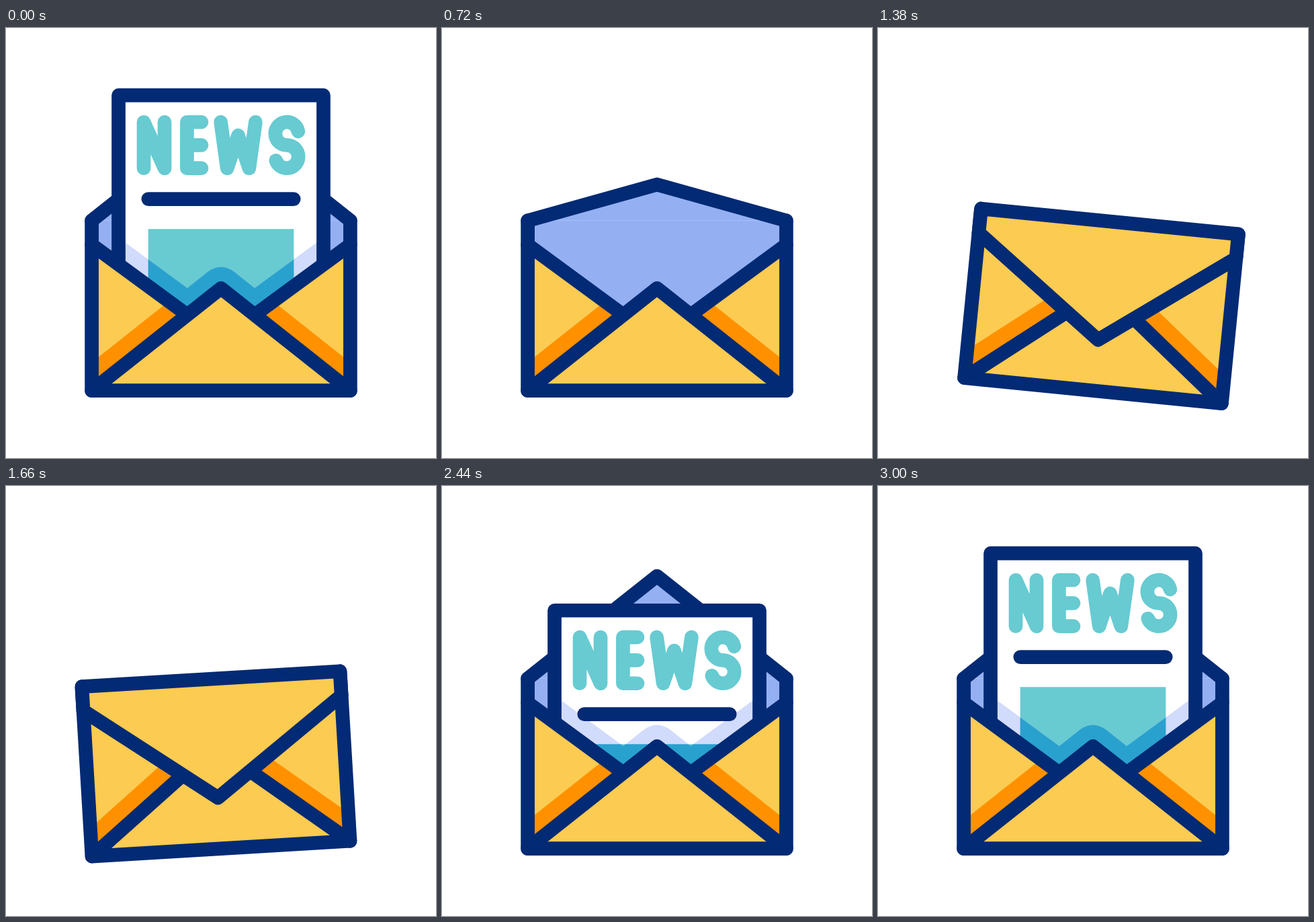
These frames come from a looping animation (640 px wide and 640 px high, 3200 ms). An HTML page with a canvas:

```html
<!DOCTYPE html>
<html lang="en">
<head>
<meta charset="utf-8">
<title>Newsletter envelope</title>
<style>
html, body { margin: 0; width: 100%; height: 100%; overflow: hidden; background: #fff; }
canvas { display: block; width: 640px; height: 640px; }
</style>
</head>
<body>
<canvas id="stage" width="640" height="640"></canvas>
<script>
const ctx = document.getElementById('stage').getContext('2d');
const LOOP = 3200, STEP = 20, SIZE = 640, MID = SIZE / 2, LINE = 20.7;
const NAVY = '#032a74', YELLOW = '#fccb51', ORANGE = '#ff9100', BLUE = '#94b0f3', PURPLE = '#6c66f8';
const LIT = { page: '#ffffff', ink: '#67cbd1' };
const SHADED = { page: '#d1dbfc', ink: '#29a1ce' };

// Envelope landmarks; everything mirrors about MID
const L = 127.6, TOP = 286.7, BASE = 539.7;
const SIDE = 322.7, TIP = 463.8, PEAK = 134, FRONT = 387.3;
const SHADE = 40, BAND = 42;

// Where the side edge meets the front triangle
const rise = (BASE - FRONT) / (MID - L), fall = (TIP - SIDE) / (MID - L);
const run = (BASE - SIDE) / (rise + fall);
const JOIN = [L + run, SIDE + fall * run];

const mix = (a, b, k) => a + (b - a) * k;

// Eased 0..1 between two times
function ramp(t, from, to) {
  const p = Math.min(1, Math.max(0, (t - from) / (to - from)));
  return p * p * (3 - 2 * p);
}

// The opening runs the closing backwards, so both share one clock
const fold = t => Math.max(0, Math.min(t, 3000 - t));
const paperShift = s => 449 * ramp(s, 400, 800) - 73 * ramp(s, 0, 400);
const flapPose = s => 1 - ramp(s, 600, 800) - ramp(s, 800, 1000);
const rayLength = t => ramp(t, 1017, 1060) - ramp(t, 1060, 1100);

function tilt(t) {
  let swing = ramp(t, 2000, 2200) - ramp(t, 1100, 1200);
  for (let i = 0; i < 4; i++) {
    const from = 1200 + 200 * i;
    swing += (i % 2 ? -2 : 2) * ramp(t, from, from + 200);
  }
  return swing * 6 * Math.PI / 180;
}

// Completes a left half with its mirror image
const mirror = half => half.concat(half.map(([x, y]) => [SIZE - x, y]).reverse());

function trace(points, close) {
  ctx.beginPath();
  points.forEach(([x, y]) => ctx.lineTo(x, y));
  if (close) ctx.closePath();
}

function fill(points, color) {
  trace(points, true);
  ctx.fillStyle = color;
  ctx.fill();
}

function stroke(points, color, close) {
  trace(points, close);
  ctx.strokeStyle = color;
  ctx.stroke();
}

function headline(color) {
  const top = 140, low = 208.7, half = (top + low) / 2, r = (low - top) / 4;
  stroke([[205, low], [205, top], [236, low], [236, top]], color);
  stroke([[291, top], [269.4, top], [269.4, low], [291, low]], color);
  stroke([[269.4, half], [291, half]], color);
  stroke([[319.6, top], [329.2, low], [345.5, 160], [361.8, low], [371.4, top]], color);
  ctx.beginPath();
  ctx.arc(418, top + r, r, -0.2, Math.PI / 2, true);
  ctx.arc(418, low - r, r, -Math.PI / 2, 2.8);
  ctx.stroke();
}

function pageFill(colors, dy) {
  ctx.save();
  ctx.translate(0, dy);
  ctx.fillStyle = colors.page;
  ctx.fillRect(167.5, 100.2, 305, 500);
  ctx.fillStyle = colors.ink;
  ctx.fillRect(211.6, 299.2, 216.8, 300);
  headline(colors.ink);
  ctx.restore();
}

function shadePath() {
  const [x, y] = JOIN;
  ctx.beginPath();
  ctx.moveTo(L, SIDE - SHADE);
  ctx.lineTo(x, y - SHADE);
  ctx.lineTo(MID - 20, 363);
  ctx.quadraticCurveTo(MID, 348, MID + 20, 363);
  ctx.lineTo(SIZE - x, y - SHADE);
  ctx.lineTo(SIZE - L, SIDE - SHADE);
  ctx.lineTo(SIZE - L, BASE);
  ctx.lineTo(L, BASE);
}

function paper(dy) {
  ctx.save();
  ctx.beginPath();
  ctx.rect(0, 0, SIZE, BASE - LINE / 2);
  ctx.clip();
  pageFill(LIT, dy);
  ctx.save();
  shadePath();
  ctx.clip();
  pageFill(SHADED, dy);
  ctx.restore();
  ctx.translate(0, dy);
  stroke(mirror([[211.8, 254.6]]), NAVY);
  stroke(mirror([[167.5, SIZE], [167.5, 100.2]]), NAVY);
  ctx.restore();
}

function pocketSide() {
  const side = [[L, SIDE], JOIN, [L, BASE]];
  fill(side, YELLOW);
  ctx.save();
  trace(side, true);
  ctx.clip();
  fill([[L, BASE - BAND], [MID, FRONT - BAND], [MID, FRONT], [L, BASE]], ORANGE);
  ctx.restore();
  stroke([[L, SIDE], JOIN], NAVY);
}

function pocket() {
  pocketSide();
  ctx.save();
  ctx.translate(SIZE, 0);
  ctx.scale(-1, 1);
  pocketSide();
  ctx.restore();
  const front = mirror([[L, BASE], [MID, FRONT]]);
  fill(front, YELLOW);
  stroke(front, NAVY);
  stroke(mirror([[L, TOP], [L, BASE]]), NAVY);
}

function openFlap(k) {
  const flap = mirror([[L, TOP], [MID, mix(TOP, PEAK, k)]]);
  fill(flap, BLUE);
  stroke(flap, NAVY);
}

function closedFlap(k) {
  const flap = mirror([[L, TOP], [L, mix(TOP, SIDE, k)], [MID, mix(TOP, TIP, k)]]);
  fill(flap, YELLOW);
  stroke(flap, NAVY, true);
}

function rays(k) {
  for (let i = -1; i <= 1; i++) {
    const x = 318 + 32.3 * i, reach = 77 - 12 * Math.abs(i);
    stroke([[x, 497.4], [x + 25 * i * k, 497.4 + reach * k]], PURPLE);
  }
}

function draw(t) {
  const s = fold(t), flap = flapPose(s), ray = rayLength(t);
  ctx.fillStyle = '#fff';
  ctx.fillRect(0, 0, SIZE, SIZE);
  ctx.lineWidth = LINE;
  ctx.lineCap = ctx.lineJoin = 'round';
  ctx.save();
  ctx.translate(MID, BASE);
  ctx.rotate(tilt(t));
  ctx.translate(-MID, -BASE);
  ctx.fillStyle = BLUE;
  ctx.fillRect(L, TOP, SIZE - 2 * L, BASE - TOP);
  if (flap >= 0) openFlap(flap);
  if (s < 800) paper(paperShift(s));
  pocket();
  if (flap < 0) closedFlap(-flap);
  if (ray > 0) rays(ray);
  ctx.restore();
}

function tick(now) {
  draw(Math.floor((now % LOOP) / STEP) * STEP);
  requestAnimationFrame(tick);
}
draw(0);
requestAnimationFrame(tick);
</script>
</body>
</html>
```
